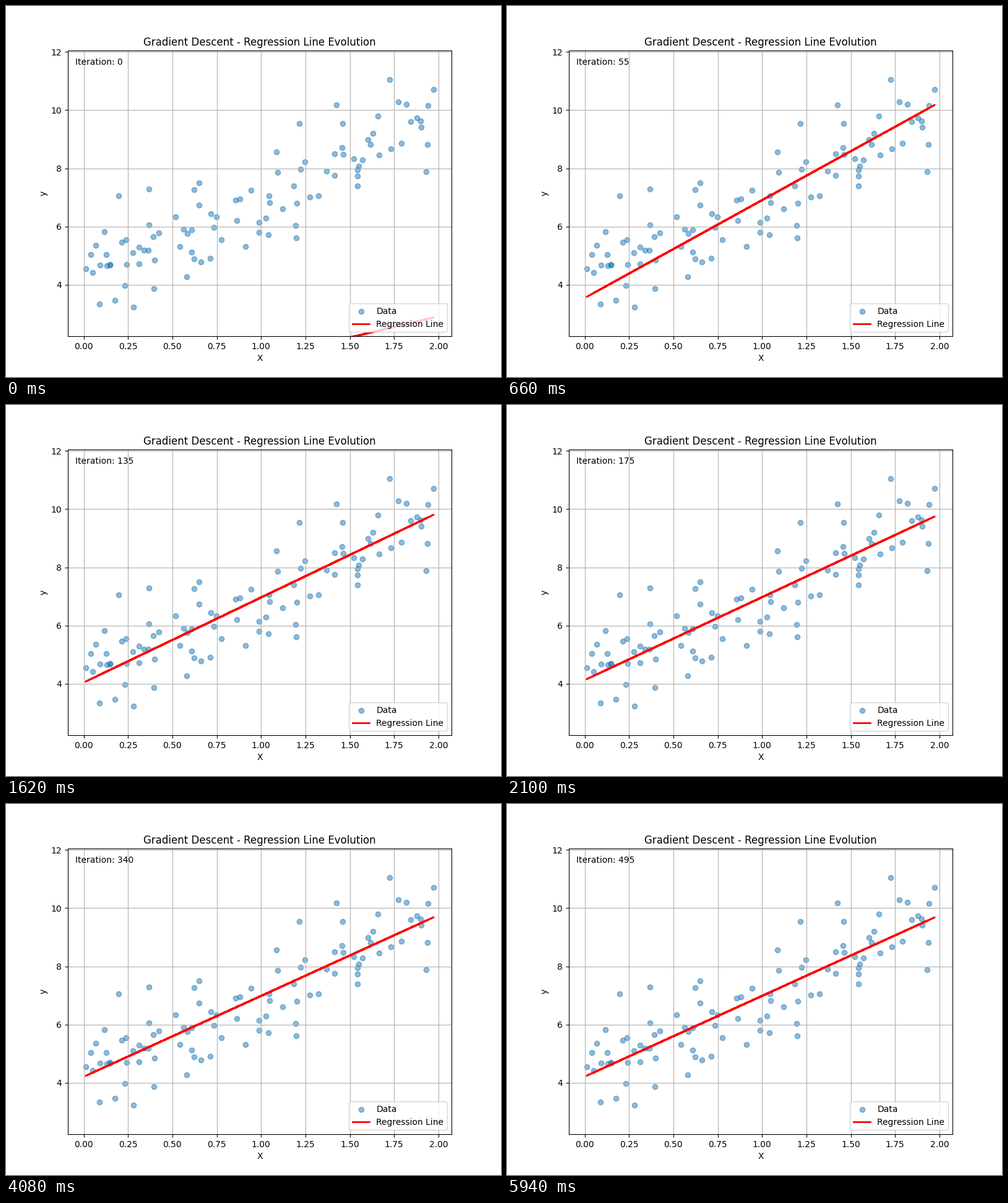
A matplotlib script that plays this animation: 800x600 px, repeating every 6000 ms.

```python
import numpy as np
import matplotlib.pyplot as plt
from matplotlib.animation import FuncAnimation

FRAMES = 100
INTERVAL = 60
STEPS_PER_FRAME = 5
RATE = 0.1

# Noisy linear data and a random starting point
np.random.seed(42)
count = 100
X = 2 * np.random.rand(count, 1)
y = 4 + 3 * X + np.random.randn(count, 1)
design = np.c_[np.ones((count, 1)), X]
theta = np.random.randn(2, 1)

# Gradient descent, keeping the parameters of every iteration
history = []
for _ in range(FRAMES * STEPS_PER_FRAME):
    history.append(theta)
    theta = theta - RATE / count * design.T @ (design @ theta - y)

fig, ax = plt.subplots(figsize=(8, 6), dpi=100)
ax.scatter(X, y, alpha=0.5, label="Data")
line, = ax.plot([], [], "r-", linewidth=2, label="Regression Line")
label = ax.text(0.02, 0.95, "", transform=ax.transAxes)
ax.set_xlim(X.min() - 0.1, X.max() + 0.1)
ax.set_ylim(y.min() - 1, y.max() + 1)
ax.set_xlabel("X")
ax.set_ylabel("y")
ax.set_title("Gradient Descent - Regression Line Evolution")
ax.legend(loc="lower right")
ax.grid(True)


def update(frame):
    step = frame * STEPS_PER_FRAME
    line.set_data(X.ravel(), (design @ history[step]).ravel())
    label.set_text(f"Iteration: {step}")
    return line, label


anim = FuncAnimation(fig, update, frames=FRAMES, interval=INTERVAL,
                     init_func=lambda: update(0), repeat=True, repeat_delay=0)
plt.show()
```
